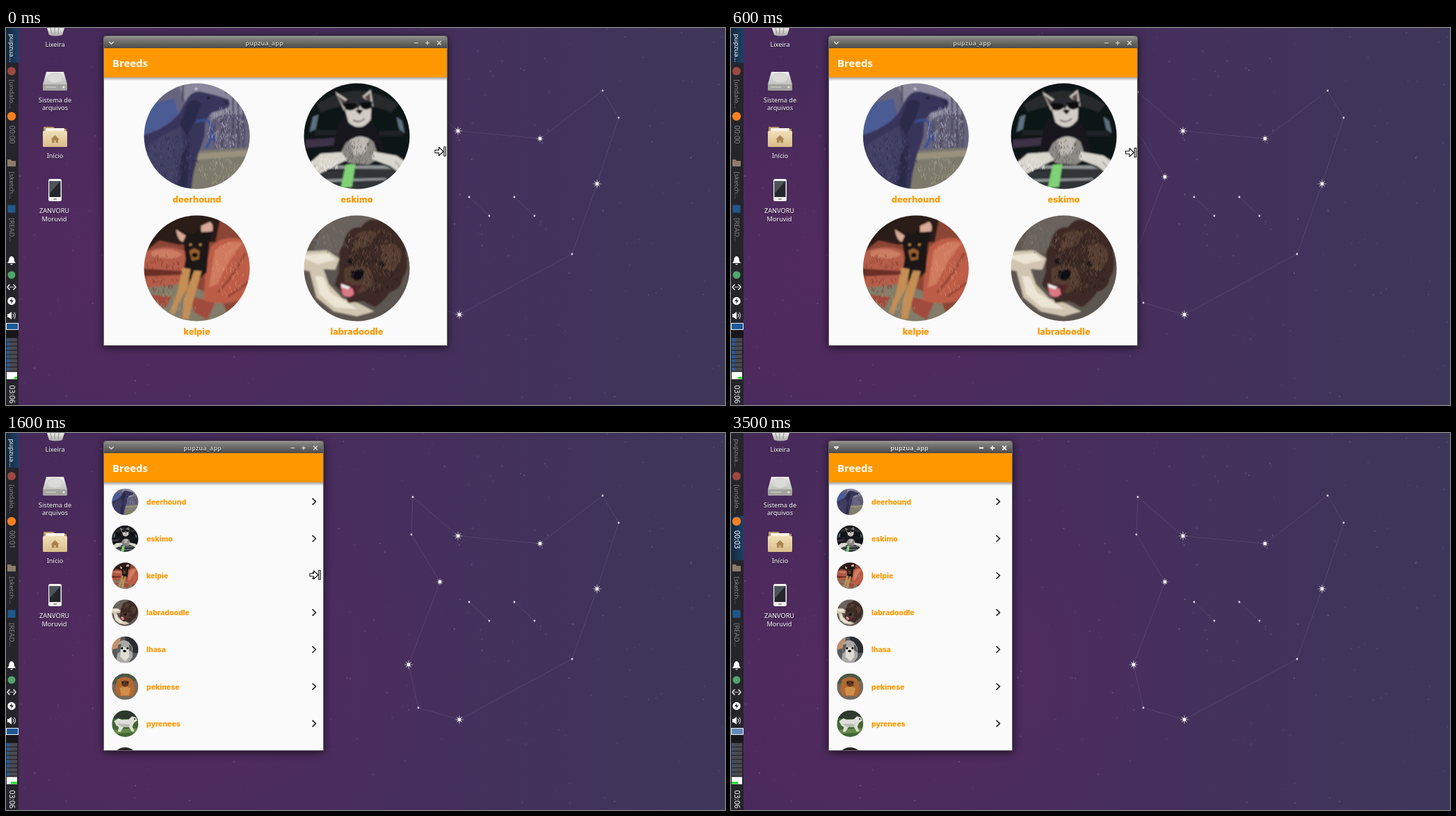
An HTML page for the animation above (3700 ms loop, 1034 by 542 pixels).

```html
<!DOCTYPE html>
<html lang="pt">
<head>
<meta charset="utf-8">
<title>Breeds</title>
<style>
html, body { margin: 0; width: 100%; height: 100%; overflow: hidden; background: #472b5c; }
#stage { display: block; width: 100%; height: 100%; }
text { font-family: "Noto Sans", "Open Sans", sans-serif; }
.desk { font-size: 9.2px; fill: #fff; text-anchor: middle; text-shadow: 0 1px 1px #0009; }
.side { font-size: 9.5px; fill: #88878c; }
.clock { font-size: 10.4px; }
.name { font-family: Inter, "Open Sans", sans-serif; font-weight: 800; fill: #ff9800; }
.big { font-size: 12.9px; text-anchor: middle; }
.small { font-size: 10.5px; }
#title { font-size: 9.2px; font-weight: 700; text-anchor: middle; text-shadow: 0 0 1px #222, 0 1px 1px #222; }
#frame { filter: drop-shadow(0 2px 6px #000a); }
.line { fill: none; stroke-linecap: round; stroke-linejoin: round; }
</style>
</head>
<body>
<svg id="stage" viewBox="0 0 1034 542" preserveAspectRatio="none">
<defs>
  <linearGradient id="sky"><stop offset="0" stop-color="#472a5a"/><stop offset=".45" stop-color="#482d5d"/><stop offset=".8" stop-color="#41335b"/><stop offset="1" stop-color="#3d375a"/></linearGradient>
  <radialGradient id="glow"><stop offset="0" stop-color="#592a63" stop-opacity=".65"/><stop offset="1" stop-color="#592a63" stop-opacity="0"/></radialGradient>
  <linearGradient id="bar" x2="0" y2="1"><stop offset="0" stop-color="#8e8e8b"/><stop offset=".5" stop-color="#6a6a68"/><stop offset="1" stop-color="#4b4b49"/></linearGradient>
  <linearGradient id="drop" x2="0" y2="1"><stop offset="0" stop-color="#000" stop-opacity=".34"/><stop offset="1" stop-color="#000" stop-opacity="0"/></linearGradient>
  <linearGradient id="active"><stop offset="0" stop-color="#13263c"/><stop offset="1" stop-color="#1d4267"/></linearGradient>
  <linearGradient id="metal" x2="0" y2="1"><stop offset="0" stop-color="#ededeb"/><stop offset="1" stop-color="#a9a9a6"/></linearGradient>
  <linearGradient id="paper" x2="0" y2="1"><stop offset="0" stop-color="#f1dfb8"/><stop offset="1" stop-color="#d9bd8a"/></linearGradient>
  <clipPath id="disc"><circle cx="76" cy="76" r="76"/></clipPath>
  <filter id="soft" x="-.1" y="-.1" width="1.2" height="1.2"><feGaussianBlur stdDeviation=".8"/></filter>

  <symbol id="deerhound" viewBox="0 0 152 152"><g clip-path="url(#disc)"><g filter="url(#soft)">
    <path fill="#66637c" d="M-9-9H161V161H-9Z"/>
    <path fill="#8a879d" d="M46-9H161V50Q125 38 100 50L60 30Z"/>
    <path fill="#4b5b95" d="M-9 34L44 22 50 50 30 66-9 92Z"/>
    <path class="line" stroke="#4c485d" stroke-width="2.500" d="M56 0V25M128 10V92M143 20V92M112 48V92M102 54V92M118 0V14M135 0L136 92"/>
    <path fill="#7d7a6c" d="M62 98L161 92V161H62Z"/>
    <path fill="#98927f" d="M74 101L161 95V104L72 110Z"/>
    <path fill="#38365a" d="M-9 78L20 67 38 56 50 44 60 26Q68 10 82 12L103 17 121 23Q126 29 120 36L98 42 88 54 87 76 78 102 71 130 67 161H-9Z"/>
    <path fill="#413f63" d="M4 90Q32 70 52 62L58 92 42 150H8Z"/>
    <path fill="#2b2948" d="M64 27Q76 20 82 29L76 48 62 76 52 58ZM54 104L66 84 62 150H49ZM112 24L122 25 120 32Z"/>
    <path class="line" stroke="#354f95" stroke-width="3.500" d="M76 55Q94 48 97 62T90 92M97 68L100 82"/>
    <circle cx="93" cy="21" r="2" fill="#15142a"/><circle cx="75" cy="8" r="1.300" fill="#fff"/>
  </g></g></symbol>

  <symbol id="eskimo" viewBox="0 0 152 152"><g clip-path="url(#disc)"><g filter="url(#soft)">
    <path fill="#101216" d="M-9-9H161V161H-9Z"/>
    <path fill="#27292a" d="M18 30Q76-8 136 30L126 42Q76 20 24 42Z"/>
    <path fill="#5d7180" d="M13 48L21 45 17 66 8 70ZM133 48L141 54 145 72 137 66Z"/>
    <path fill="#3c3046" d="M3 81L46 78 48 89 2 93Z"/>
    <path fill="#1d2026" d="M18 67H52V75H14ZM108 68H138L144 76H105Z"/>
    <path fill="#303438" d="M-9 128L161 120V161H-9Z"/>
    <path fill="#8f9495" d="M38 118H115L127 123H30ZM30 138L118 136V139L32 142Z"/>
    <path fill="#17181b" d="M50 56L62 46 94 46 108 72 118 108H38Z"/>
    <path fill="#c6c2ba" d="M45 12L62 23 58 40ZM84 19L96 9 100 34Z"/>
    <path fill="#594846" d="M48 17L59 25 57 34ZM87 20L95 14 96 28Z"/>
    <path fill="#d2cec7" d="M57 31Q76 18 97 31L96 52Q82 72 64 56Z"/>
    <path fill="#2c2c30" d="M58 26Q77 14 97 27L94 33Q82 24 78 38 70 24 62 34Z"/>
    <path fill="#090b0d" d="M55 28L75 29 76 35Q70 41 60 38ZM80 28L98 26 98 34Q90 41 82 35Z"/>
    <path fill="#111" d="M74 39Q80 36 85 39L80 45Z"/>
    <path class="line" stroke="#4a4343" stroke-width="1.600" d="M71 53Q79 58 87 51"/>
    <path fill="#8d8a85" d="M60 86Q81 68 100 84L108 108 93 117 66 115 50 106Z"/>
    <path fill="#bbb7b0" d="M66 82Q80 72 94 80L88 100 72 104Z"/>
    <path fill="#d8d5cd" d="M54 99L24 101 4 118 11 136 38 122 62 110ZM99 98L133 104 152 117 143 133 124 119 98 109Z"/>
    <path class="line" stroke="#a09b93" stroke-width="1.500" d="M8 126L18 117M18 130L26 121M132 113L142 125"/>
    <path class="line" stroke="#c8c8cc" stroke-width="1.300" d="M84 78L88 98"/>
    <path fill="#7fd276" d="M60 117L74 116 69 149 53 150Z"/>
  </g></g></symbol>

  <symbol id="kelpie" viewBox="0 0 152 152"><g clip-path="url(#disc)"><g filter="url(#soft)">
    <path fill="#8c4536" d="M-9-9H161V161H-9Z"/>
    <path fill="#2a1a16" d="M-9-9H112L103 38 50 42 22 36-9 60Z"/>
    <path fill="#b45d49" d="M-9 58Q30 36 62 53L68 78 59 103-9 104Z"/>
    <path fill="#cc7c64" d="M10 52Q36 43 56 56L44 62 12 60Z"/>
    <path fill="#6a2d25" d="M-9 76L58 80 60 85-9 88Z"/>
    <path fill="#827c67" d="M-9 105L60 98 112 120 126 161H-9Z"/>
    <path fill="#a04c3d" d="M3 113L39 117 30 134ZM66 116L102 125 91 150 72 139Z"/>
    <path fill="#bd5d47" d="M96 45Q122 20 161 44V112Q123 134 86 122L88 79Z"/>
    <path fill="#d07a5e" d="M102 50Q124 32 142 40 122 62 106 98L93 104Z"/>
    <path class="line" stroke="#954333" stroke-width="3" d="M145 55Q132 83 107 110M122 116L150 96"/>
    <path fill="#1a1617" d="M46 19L58 24 72 27 82 18 96 9 100 18 94 38 92 59 90 82 71 98 56 85 60 62 57 41Z"/>
    <path fill="#d9a997" d="M46 20L60 29 56 38Q48 36 46 20ZM82 15L95 9Q101 14 98 23L82 24Z"/>
    <path fill="#96602f" d="M65 51L72 47 80 51 79 63 69 65Z"/>
    <circle cx="67" cy="42" r="2" fill="#b08247"/><circle cx="81" cy="42" r="2" fill="#b08247"/>
    <ellipse cx="73" cy="57" rx="4" ry="3.500" fill="#111"/>
    <path fill="#c48e54" d="M55 75L67 77 62 105 50 126 43 143 38 139 48 109ZM72 79L83 80 72 118 64 149 55 148 57 122Z"/>
  </g></g></symbol>

  <symbol id="labradoodle" viewBox="0 0 152 152"><g clip-path="url(#disc)"><g filter="url(#soft)">
    <path fill="#5d554f" d="M-9-9H161V161H-9Z"/>
    <path fill="#6a625c" d="M26 16L73-9 111 4 62 30 50 55 15 48Z"/>
    <path fill="#cfc5b0" d="M-9 52L33 50 51 62 45 78 28 77 36 99 55 119 78 126 101 138 76 145 43 138 18 118 8 80-9 77Z"/>
    <path fill="#ece4d4" d="M-9 58L34 54 46 64 20 70ZM16 87L27 88 38 111 62 125 77 135 44 132 22 113Z"/>
    <path fill="#3d2b26" d="M58 35Q65 15 82 17 93 1 109 8 129 6 135 22 149 34 147 56 152 76 142 90 140 106 124 110 115 124 102 132L84 123 64 126 56 111 44 100 50 81 51 52Z"/>
    <path fill="#553d32" d="M74 28Q91 17 106 25L95 43 70 51ZM111 44Q138 34 141 59L129 80 112 77ZM58 77Q75 66 95 77L102 99 82 112 58 106Z"/>
    <circle cx="67" cy="66" r="4" fill="#171313"/><circle cx="113" cy="70" r="4" fill="#171313"/>
    <path fill="#100f12" d="M68 81Q77 74 86 80 88 90 77 94 67 92 68 81Z"/>
    <path fill="#51252a" d="M51 93Q68 102 84 99L73 117Q56 121 51 93Z"/>
    <path fill="#db7984" d="M53 102L70 105 72 113Q64 121 56 114Z"/>
    <path fill="#eee" d="M53 98L67 103 63 106 54 103Z"/>
  </g></g></symbol>

  <symbol id="lhasa" viewBox="0 0 152 152"><g clip-path="url(#disc)">
    <path fill="#555a5d" d="M0 0H152V152H0Z"/><path fill="#c78e68" d="M0 0H52L39 64 0 78Z"/><path fill="#292d30" d="M72 0H152V94H96Z"/>
    <path fill="#aaa9a4" d="M33 44Q56 8 97 31L119 64 119 119 95 152H24L32 96Z"/>
    <path fill="#deddd5" d="M52 75L72 60 97 75 101 115 77 143 48 116Z"/>
    <path fill="#5e5d5c" d="M35 48L55 42 46 88 32 99ZM98 46L113 57 117 91 100 80Z"/>
    <circle cx="58" cy="68" r="6"/><circle cx="90" cy="68" r="6"/><ellipse cx="73" cy="84" rx="9" ry="7"/>
  </g></symbol>
  <symbol id="pekinese" viewBox="0 0 152 152"><g clip-path="url(#disc)">
    <path fill="#77695a" d="M0 0H152V152H0Z"/><path fill="#4b5746" d="M0 0H152V40L0 64Z"/>
    <path fill="#b06930" d="M29 36Q75 4 119 35L134 93 117 129H36L19 94Z"/>
    <path fill="#d08e4b" d="M45 83Q75 69 106 84L98 126H53Z"/>
    <path fill="#5e371f" d="M54 46L75 40 98 46 94 68 75 78 58 68Z"/>
    <circle cx="62" cy="52" r="5" fill="#111"/><circle cx="90" cy="52" r="5" fill="#111"/>
  </g></symbol>
  <symbol id="pyrenees" viewBox="0 0 152 152"><g clip-path="url(#disc)">
    <path fill="#426735" d="M0 0H152V152H0Z"/><path fill="#2e392d" d="M0 0H152V51L0 45Z"/><path fill="#658a49" d="M0 111L152 100V125L0 134Z"/>
    <path fill="#dedfd8" d="M13 61L37 45 57 53 97 51 116 33 140 41 145 58 126 72 118 94 129 120 114 121 98 95 68 94 49 123 34 122 40 96 25 85Z"/>
    <path fill="#b8bbb1" d="M29 75L105 79 98 94H57Z"/><circle cx="131" cy="49" r="4"/>
  </g></symbol>
  <symbol id="dark" viewBox="0 0 152 152"><circle cx="76" cy="76" r="76" fill="#282123"/></symbol>
</defs>

<rect width="1034" height="542" fill="url(#sky)"/>
<ellipse cx="190" cy="340" rx="470" ry="310" fill="url(#glow)"/>
<g id="stars"></g>

<g id="desktop">
  <path fill="url(#metal)" d="M59 0H84L81 10Q71 13 62 10Z"/>
  <path class="line" stroke="#898986" d="M64 0L66 8M70 0V8M76 0L75 8"/>
  <path fill="url(#metal)" d="M58 63H83L88 81V88Q88 90 86 90H55Q53 90 53 88V81Z"/>
  <path fill="#a3a3a0" d="M53 81H88V88Q88 90 86 90H55Q53 90 53 88Z"/>
  <ellipse cx="70.500" cy="72" rx="11" ry="7" fill="#dadad7" stroke="#c6c6c3" stroke-width=".7"/>
  <path stroke="#d8d8d5" d="M57 85H72"/><circle cx="83" cy="85" r="1.500" fill="#eee"/>
  <path fill="#b79765" d="M54 142H68L71 145H87V160H54Z"/>
  <path fill="#f7f3e8" d="M57 144H84V156H57Z"/>
  <rect x="53" y="148" width="35" height="23" rx="1.500" fill="url(#paper)"/>
  <path fill="#a98350" d="M70.500 154L64.500 160H66V165H69.500V161.500H71.500V165H75V160H76.500Z"/>
  <rect x="61" y="217" width="19" height="32" rx="2.500" fill="#f2f2f0"/>
  <rect x="62.500" y="220" width="16" height="23" fill="#23262b"/>
  <path fill="#4d5359" d="M62.500 220H78.500L62.500 238Z"/>
  <rect x="68" y="245" width="5" height="2" rx="1" fill="#999"/>
</g>

<g id="panel">
  <rect width="18" height="542" fill="#25242b"/>
  <rect id="task" width="18" fill="url(#active)"/>
  <circle cx="8" cy="62" r="6" fill="#9c4a41"/>
  <circle cx="8" cy="127" r="6.200" fill="#f48024"/>
  <path fill="#8d7c69" d="M2 189H7L8 191H14V199H2Z"/>
  <rect x="2.500" y="254.500" width="11" height="11" fill="#20588c"/>
  <path fill="#fff" d="M8 328Q12 329 12 335L14 338H2L4 335Q4 329 8 328ZM6 339H10Q8 342 6 339Z"/>
  <circle cx="8" cy="355" r="5.500" fill="#50a66b"/>
  <path class="line" stroke="#fff" stroke-width="1.400" d="M5 369L2 372.500 5 376M11 369L14 372.500 11 376M6 372.500H6.100M8 372.500H8.100M10 372.500H10.100"/>
  <circle cx="8" cy="392.500" r="5.700" fill="#fff"/><path fill="#25242b" d="M9 388L5 393H8L7 397 11 391.500H8Z"/>
  <path fill="#fff" d="M2 411H4L8 408V419L4 416H2Z"/><path class="line" stroke="#fff" d="M10 411Q12 413.500 10 416M12 409Q15 413.500 12 418"/>
  <rect id="space" x=".5" y="424.500" width="17" height="9" stroke="#e8eef5"/>
  <rect x="0" y="435" width="18" height="10" fill="#17171b"/>
  <g id="cpu"></g>
  <rect x="1" y="494.500" width="15" height="10.500" fill="#fff"/>
  <rect id="load" y="501.500" height="3" fill="#10dd18"/>
</g>

<g id="window">
  <path id="frame" fill="#6a6a68"/>
  <path id="head" fill="url(#bar)"/>
  <path id="shine" stroke="#a8a8a4" stroke-width=".8"/>
  <text id="title" y="24.500">pupzua_app</text>
  <path id="menu" class="line"/>
  <path id="tools" class="line"/>
  <rect id="appbar" x="141" y="29" height="42" fill="#ff9800"/>
  <text x="153" y="56" font-size="14.900" font-weight="600" fill="#fff">Breeds</text>
  <svg id="view" x="141" y="71" height="385" overflow="hidden">
    <rect width="600" height="385" fill="#fafafa"/>
    <g id="grid"></g>
    <g id="list"></g>
    <rect width="600" height="5" fill="url(#drop)"/>
  </svg>
</g>

<g id="grip" fill="#fff" stroke="#111" stroke-width="1.100" stroke-linejoin="round">
  <path d="M-15-2H-9.500V-6L-3 0-9.500 6V2H-15Z"/><rect x="-2.200" y="-6.500" width="2.400" height="13"/>
</g>
<path id="arrow" fill="#fff" stroke="#111" stroke-width="1.100" stroke-linejoin="round" d="M0 0V14L3.500 11 6 16 8.500 15 6 10H10.500Z"/>
</svg>

<script>
const LOOP = 3700, STEP = 100, LEFT = 141;
const $ = id => document.getElementById(id);

function add(parent, tag, attrs, text) {
  const el = document.createElementNS("http://www.w3.org/2000/svg", tag);
  set(el, attrs);
  if (text) el.textContent = text;
  return parent.appendChild(el);
}
function set(el, attrs) {
  for (const key in attrs) el.setAttribute(key, attrs[key]);
}
function at(points, t) {
  const i = points.findIndex(p => p[0] > t);
  if (i < 0) return points[points.length - 1][1];
  if (i === 0) return points[0][1];
  const [a, b] = [points[i - 1], points[i]];
  return a[1] + (b[1] - a[1]) * (t - a[0]) / (b[0] - a[0]);
}
let seed = 41;
const random = () => (seed = (seed * 16807) % 2147483647) / 2147483647;

// Night sky
const corners = [[585, 92], [583, 146], [624, 214, 5.8], [579, 333, 7.5], [593, 395], [652, 412, 7.5], [814, 325],
  [850, 224, 7.5], [881, 129], [858, 90], [768, 159, 5.8], [650, 148, 7.5]];
const pairs = [[666, 243], [695, 270], [731, 243], [760, 270]];
for (let i = 0; i < 270; i++) {
  add($("stars"), "circle", { cx: 20 + random() * 1014, cy: random() * 542, r: .5 + random() * .5,
    fill: "#b9a5cf", opacity: .12 + random() * .3 });
}
add($("stars"), "path", { d: `M${corners.map(p => p.slice(0, 2)).join("L")}ZM${pairs[0]}L${pairs[1]}M${pairs[2]}L${pairs[3]}`,
  fill: "none", stroke: "#b39cc3", "stroke-width": .8, opacity: .22 });
for (const [x, y, size] of corners.concat(pairs)) {
  add($("stars"), "circle", { cx: x, cy: y, r: size ? 2 : 1.4, fill: "#e6dfec" });
  if (!size) continue;
  const rays = Array.from({ length: 16 }, (_, i) => {
    const r = i % 2 ? 1.6 : i % 4 ? size * .85 : size, a = i * Math.PI / 8;
    return [x + r * Math.cos(a), y + r * Math.sin(a)];
  });
  add($("stars"), "path", { d: `M${rays.join("L")}Z`, fill: "#fff" });
}

// Short strokes of fur, leaves and cloth inside an ellipse of a photo
function fleck(photo, color, count, cx, cy, rx, ry) {
  let d = "";
  for (let i = 0; i < count; i++) {
    const a = random() * 2 * Math.PI, r = Math.sqrt(random());
    d += `M${(cx + rx * r * Math.cos(a)).toFixed(1)} ${(cy + ry * r * Math.sin(a)).toFixed(1)}` +
      `q${(random() * 4 - 2).toFixed(1)} 1 ${(random() * 4 - 2).toFixed(1)} 4`;
  }
  add($(photo).firstElementChild, "path", { class: "line", d, stroke: color, "stroke-width": 1, opacity: .6 });
}
fleck("deerhound", "#b4b1c2", 110, 118, 62, 28, 32);
fleck("deerhound", "#403c52", 70, 122, 66, 26, 28);
fleck("deerhound", "#a7a18c", 90, 110, 124, 32, 20);
fleck("deerhound", "#55537a", 90, 38, 108, 30, 38);
fleck("deerhound", "#29274a", 70, 45, 104, 32, 40);
fleck("eskimo", "#55524f", 45, 80, 98, 22, 18);
fleck("eskimo", "#f1eee8", 40, 30, 115, 20, 10);
fleck("kelpie", "#dc9477", 70, 120, 75, 24, 38);
fleck("kelpie", "#7e3429", 60, 28, 82, 26, 28);
fleck("kelpie", "#ad9d7e", 60, 40, 126, 36, 18);
fleck("labradoodle", "#76594a", 130, 103, 62, 38, 44);
fleck("labradoodle", "#211815", 130, 100, 65, 42, 48);
fleck("labradoodle", "#837a72", 70, 38, 30, 30, 24);

// Desktop and panel labels
[["Lixeira", 70.5, 26.5], ["Sistema de", 70.5, 106.5], ["arquivos", 70.5, 117.5], ["Início", 70.5, 186.5],
  ["ZANVORU", 69.5, 266], ["Moruvid", 69.5, 277.5]].forEach(([s, x, y]) => add($("desktop"), "text", { x, y, class: "desk" }, s));

const sideText = (s, y, cls = "") =>
  add($("panel"), "text", { class: "side " + cls, transform: `translate(4.5 ${y}) rotate(90)` }, s);
const appTask = sideText("pupzua...", 8.5);
sideText("[undalo...", 74);
const timer = sideText("00:00", 140, "clock");
sideText("[sketch...", 206.5);
sideText("[READ...", 273);
set(sideText("03:06", 513.5, "clock"), { style: "fill:#fff" });

const meters = Array.from({ length: 8 }, (_, i) => {
  const y = 446 + i * 6;
  add($("cpu"), "rect", { x: 1, y, width: 15, height: 4.8, fill: "#4a4a4f" });
  return add($("cpu"), "rect", { x: 1, y, height: 4.8, fill: "#245b9b" });
});

// Both layouts of the app
const breeds = ["deerhound", "eskimo", "kelpie", "labradoodle", "lhasa", "pekinese", "pyrenees"];
const cards = breeds.slice(0, 4).map((name, i) => {
  const card = add($("grid"), "g", {}), y = i < 2 ? 8.5 : 198.5;
  add(card, "use", { href: "#" + name, x: -76, y, width: 152, height: 152 });
  add(card, "text", { class: "name big", y: y + 171 }, name);
  return card;
});
breeds.concat("dark").forEach((name, i) => {
  const y = 27.9 + i * 53.17;
  add($("list"), "use", { href: "#" + name, x: 11.3, y: y - 19, width: 38, height: 38 });
  if (name !== "dark") add($("list"), "text", { class: "name small", x: 61, y: y + 3.8 }, name);
});
const chevrons = add($("list"), "path", { class: "line", stroke: "#222", "stroke-width": 1.6, "stroke-linecap": "butt",
  d: breeds.map((_, i) => `M-2 ${23.4 + i * 53.17}l4.5 4.2-4.5 4.2`).join("") });

// Motion: [ms, value]
const edge = [[0, 634], [200, 614], [600, 584], [900, 543], [1200, 509], [1600, 456], [1800, 419], [2100, 404]];
const lag = [[0, 4], [200, 2.5], [600, 19.5], [800, 8], [1600, 7], [2100, 0]];
const gripDx = [[0, -2], [200, -.5], [600, -1.5], [900, -4.5], [1600, -4], [2100, 0]];
const gripY = [[0, 177.5], [200, 177.5], [600, 179], [900, 184], [1600, 204], [2100, 213.5]];
const arrowX = [[2600, 386], [2800, 250], [3000, 74], [3100, 38], [3200, 14], [3300, 7]];
const arrowY = [[2600, 210], [2800, 180], [3000, 152], [3300, 142]];

const show = (el, on) => set(el, { visibility: on ? "visible" : "hidden" });

function draw(t) {
  const right = Math.round(at(edge, t)), layout = right + at(lag, t) - LEFT;
  const focused = t < 3500, wide = t < 800;

  set($("frame"), { d: `M140 457V15Q140 11 144 11H${right - 3}Q${right + 1} 11 ${right + 1} 15V457Z` });
  set($("head"), { d: `M141 29V16Q141 12 145 12H${right - 4}Q${right} 12 ${right} 16V29Z` });
  set($("shine"), { d: `M145 12.500H${right - 4}` });
  set($("appbar"), { width: right - LEFT });
  set($("view"), { width: right - LEFT });
  set($("title"), { x: (LEFT + right) / 2 - 16, fill: focused ? "#c9c9c6" : "#e4e4e1" });

  const ink = focused ? "#dededc" : "#f8f8f6";
  set($("menu"), { d: focused ? "M148.500 20L151.500 23 154.500 20" : "M148.500 20H154.500L151.500 23Z",
    stroke: ink, "stroke-width": 1.4, fill: focused ? "none" : ink });
  set($("tools"), { stroke: ink, "stroke-width": focused ? 1.2 : 1.8,
    d: `M${right - 46.5} 21.500h5M${right - 30.5} 21.500h5m-2.500-2.500v5M${right - 13.5} 19l5 5m0-5l-5 5` });

  show($("grid"), wide);
  show($("list"), !wide);
  cards.forEach((card, i) => {
    const x = i % 2 ? layout * .75 - 9.25 : layout * .25 + 9.25;
    set(card, { transform: `translate(${x} 0)` });
  });
  show(chevrons, t >= 1300);
  set(chevrons, { transform: `translate(${layout - 20} 0)` });

  show($("grip"), t < 2600);
  set($("grip"), { transform: `translate(${right + at(gripDx, t)} ${at(gripY, t)})` });
  show($("arrow"), t >= 2600 && focused);
  set($("arrow"), { transform: `translate(${at(arrowX, t)} ${at(arrowY, t)})` });

  set($("task"), focused ? { y: 0, height: 50 } : { y: 119, height: 64 });
  appTask.style.fill = focused ? "#fff" : "";
  timer.style.fill = focused ? "" : "#fff";
  timer.textContent = "00:0" + Math.floor(t / 1000);
  set($("space"), { fill: focused ? "#1e5796" : "#6089b8" });

  // System monitor refreshes twice a second
  const tick = Math.floor((t + 200) / 500), busy = [4, 4.5, 3, 4, 2, .5, 1.5, 1.5][tick];
  meters.forEach((m, i) => set(m, { width: busy * (.7 + .5 * Math.abs(Math.sin(i * 2.3 + tick * 1.7))) }));
  const from = Math.max(1, 12 - tick * 1.7), to = Math.min(16, 22 - tick * 1.7);
  set($("load"), { x: from, width: to - from });
}

const start = performance.now();
let last = -1;
function loop() {
  const t = Math.floor(((performance.now() - start) % LOOP) / STEP) * STEP;
  if (t !== last) draw(last = t);
  requestAnimationFrame(loop);
}
loop();
</script>
</body>
</html>
```
